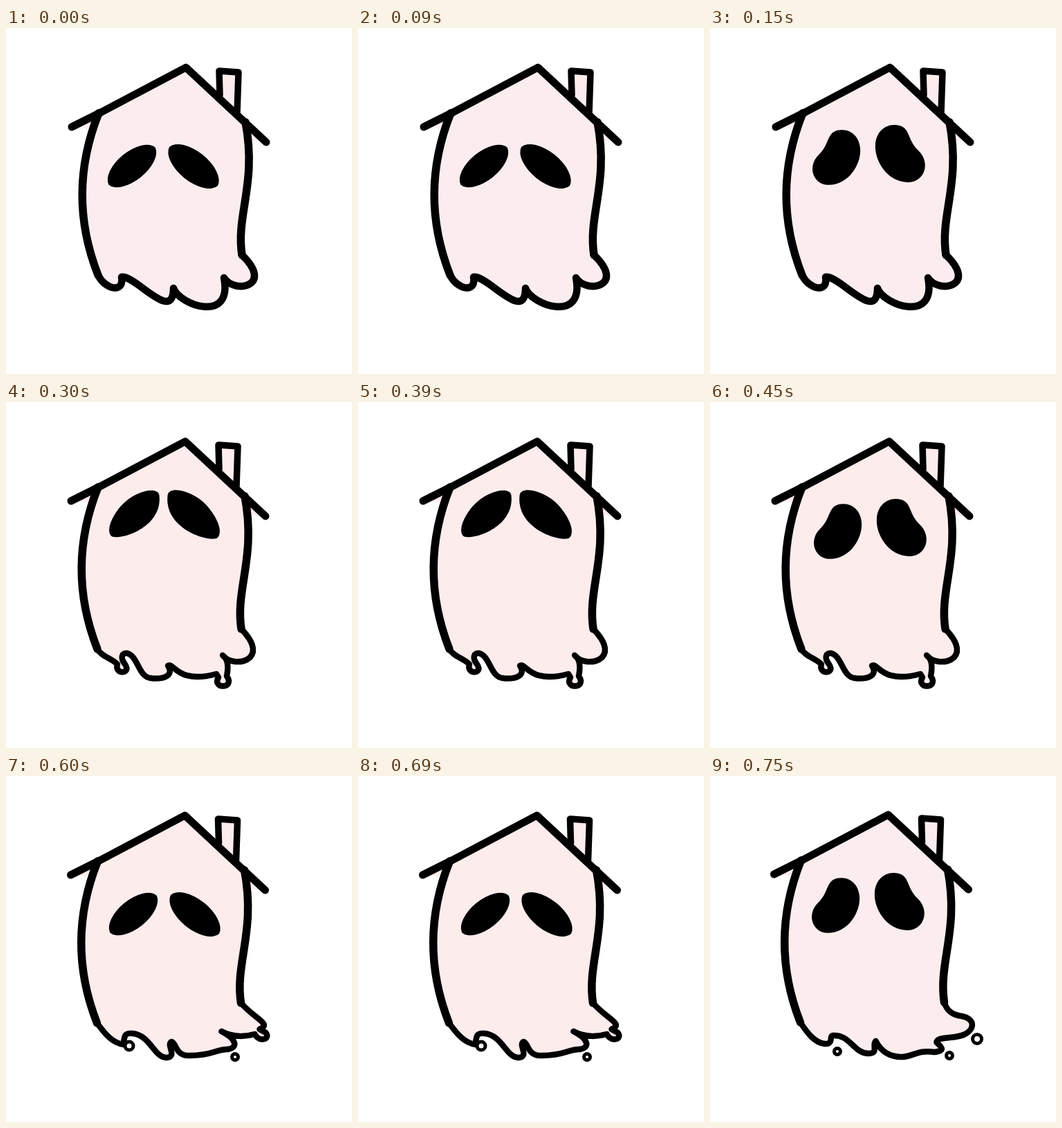
Animation, 500 px wide and 500 px high, one loop 0.9 s. Source, as an HTML page with a canvas:

```html
<!DOCTYPE html>
<html lang="en">
<head>
<meta charset="utf-8">
<title>Melting ghost house</title>
<style>
html, body { margin: 0; width: 100%; height: 100%; overflow: hidden; background: #fff; }
canvas { display: block; }
</style>
</head>
<body>
<canvas id="stage" width="500" height="500"></canvas>
<script>
const ctx = document.getElementById('stage').getContext('2d');
const STEP = 150;
const INK = '#000', COOL = '#fbeded', WARM = '#fdecec';

const ROOF = new Path2D('M95 143L137 122L260 57L376 165');
const CHIMNEY = new Path2D('M309 97L308 62L336 64L334 122');

// The sides always run to the same two points; only the hem between them changes.
const LEFT = 'M134 123Q87 240 133 357';
const RIGHT = 'C332 270 363 225 346 136';

function makeBody(hem) {
  return {
    outline: new Path2D(LEFT + hem + RIGHT),
    hem: new Path2D('M133 357' + hem),
    sides: new Path2D(LEFT + 'M341 328' + RIGHT)
  };
}

// One curve per scallop, drip or curl, left to right
const calm = makeBody(`C143 378 171 384 167 360 C186 356 242 428 242 376
  C250 400 328 428 315 361 C330 385 388 373 341 328`);
const sagging = makeBody(`C139 368 155 371 162 379 C157 394 183 394 173 379
  C166 370 168 362 176 363 C192 367 192 397 210 399 C226 401 245 397 235 381
  C244 376 248 408 305 393 L308 398 C298 415 333 415 320 396
  C322 386 323 372 314 366 C329 386 386 374 341 328`);
const dripping = makeBody(`C143 370 153 385 171 388 C173 376 172 371 184 372
  C210 374 216 408 234 407 C250 405 232 388 241 384 C248 386 246 405 267 404
  C300 404 308 394 322 395 C338 392 334 380 313 369 C330 379 351 376 361 373
  C368 386 384 380 377 371 L368 366 C386 358 362 352 341 328`);
const trailing = makeBody(`C143 372 153 386 168 388 C182 389 174 377 180 376
  C205 374 210 402 232 402 C247 401 236 390 242 384 C250 400 264 407 279 407
  C295 407 303 396 327 400 C345 398 335 391 330 386 C330 377 355 381 369 375
  C385 368 387 352 366 348 C350 346 344 338 341 328`);

// Right eye around its own centre; the left one is its smaller mirror image.
const makeEyes = (shape, left, right) => ({ shape: new Path2D(shape), left, right });
const oval = makeEyes('M-35 -28A45 23.5 39 0 1 35 28A45 23.5 39 0 1 -35 -28Z',
  [182, 199.5], [271, 200]);
const pebble = makeEyes(`M-9 -42C16 -42 8 -22 26 -5C44 12 36 40 12 41
  C-20 41 -38 8 -36 -14C-35 -30 -24 -42 -9 -42Z`, [182.5, 187.5], [275, 182]);
const raised = makeEyes(`M-37 -27C-35 -42 0 -34 20 -12C36 6 44 28 34 35
  C18 40 -42 20 -37 -27Z`, [184, 161], [268.5, 162]);

const still = { body: calm, tint: COOL, weight: 10.5, dx: 0, dy: 0, gaze: 0, drops: [] };
const melt = { ...still, body: sagging, tint: WARM, weight: 8.5, dx: -1, gaze: 2 };
const poses = [
  { ...still, eyes: oval },
  { ...still, eyes: pebble },
  { ...melt, eyes: raised },
  { ...melt, eyes: pebble },
  { ...melt, eyes: oval, body: dripping, dx: -1.5, drops: [[178, 390, 6], [331, 406, 4.5]] },
  { ...still, eyes: pebble, body: trailing, weight: 8.5, dx: -2.5, dy: -1, gaze: -1,
    drops: [[184, 398, 4.5], [346, 404, 4.5], [386, 380, 6.5]] }
];

function stroke(path, weight) {
  ctx.lineWidth = weight;
  ctx.stroke(path);
}

function drawEye(shape, [x, y], scaleX, scaleY) {
  ctx.save();
  ctx.translate(x, y);
  ctx.scale(scaleX, scaleY);
  ctx.fill(shape);
  ctx.restore();
}

function drawHouse({ body, tint, weight, dx, dy }) {
  ctx.save();
  ctx.translate(dx, dy);
  ctx.fillStyle = tint;
  ctx.fill(CHIMNEY);
  ctx.fill(ROOF);
  ctx.fill(body.outline);
  stroke(CHIMNEY, 9.5);
  stroke(body.hem, weight);
  stroke(body.sides, 11.5);
  stroke(ROOF, 11);
  ctx.restore();
}

function draw(pose) {
  ctx.fillStyle = '#fff';
  ctx.fillRect(0, 0, 500, 500);
  ctx.lineCap = ctx.lineJoin = 'round';
  ctx.strokeStyle = INK;
  drawHouse(pose);

  ctx.save();
  ctx.translate(pose.gaze, 0);
  ctx.fillStyle = INK;
  const { shape, left, right } = pose.eyes;
  drawEye(shape, left, -0.96, 0.96);
  drawEye(shape, right, 1, 1);
  ctx.restore();

  for (const [x, y, radius] of pose.drops) {
    const drop = new Path2D();
    drop.arc(x, y, radius, 0, 2 * Math.PI);
    stroke(drop, 5);
  }
}

const start = performance.now();
function tick() {
  const elapsed = performance.now() - start;
  draw(poses[Math.floor(elapsed / STEP) % poses.length]);
  requestAnimationFrame(tick);
}
tick();
</script>
</body>
</html>
```
